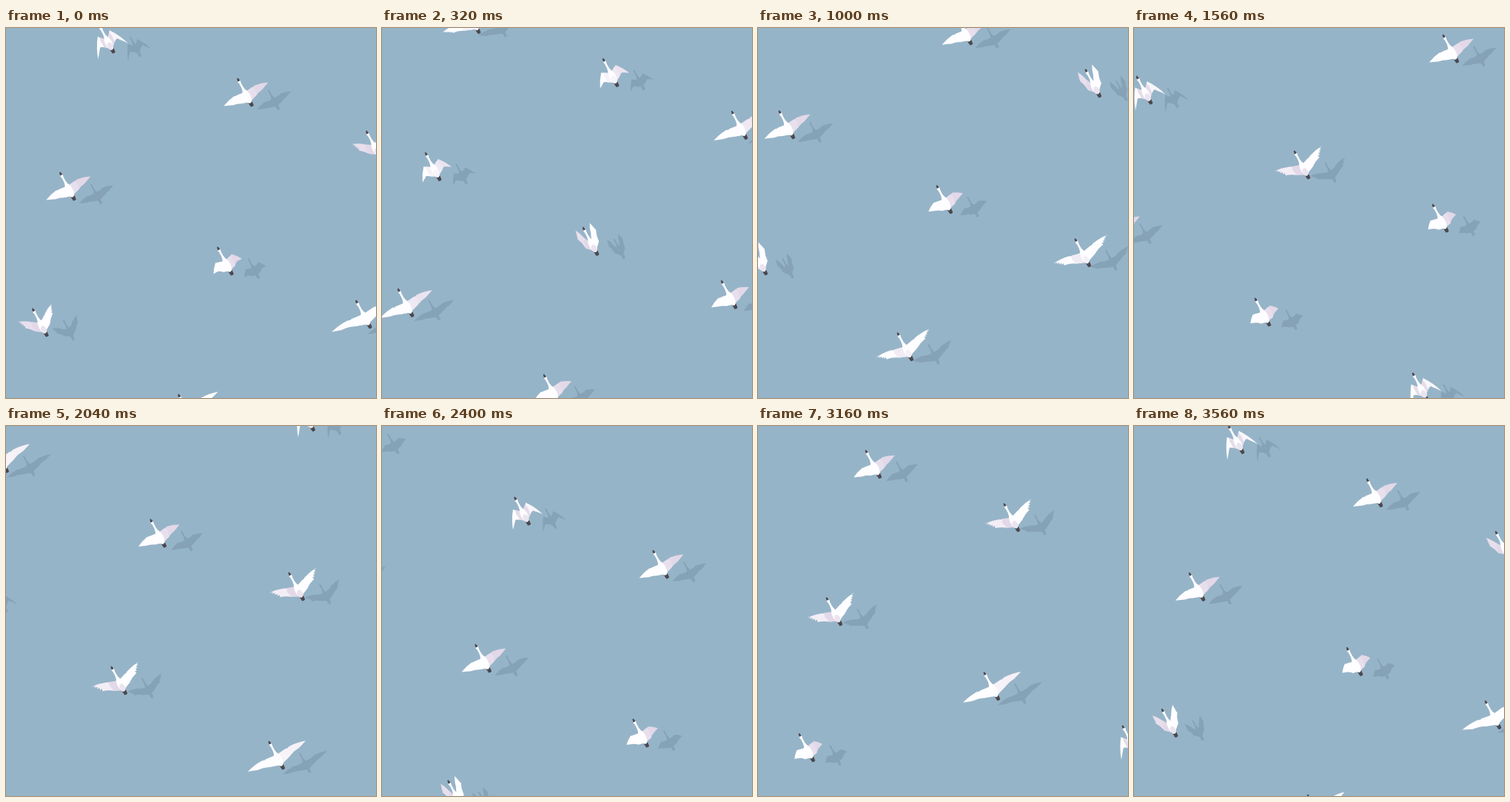
Recreate the animation shown at these times as an HTML page. Size 500 px wide and 500 px high, loop 3600 ms.

```html
<!DOCTYPE html>
<html lang="en">
<head>
<meta charset="utf-8">
<title>Swans</title>
<style>
html, body { margin: 0; width: 100%; height: 100%; overflow: hidden; background: #96b4c8; }
svg { display: block; width: 100vw; height: 100vh; }
</style>
</head>
<body>
<svg viewBox="0 0 500 500">
  <rect width="500" height="500" fill="#96b4c8"/>
  <g id="shadows" fill="#86a2b7"></g>
  <g id="birds"></g>
</svg>
<script>
const LOOP = 3600, STEP = 40, BEAT = 1120;
const DRIFT = { x: 160, y: 300 };
const WHITE = [254, 253, 255], LILAC = [226, 216, 232], DARK = "#4b484f";

// Key points of one wing as [sideways, forward] from the tail; a pose is reached at "at" and kept for "hold" ms
const POSES = [
  { at: 0, hold: 60, wrist: [6, 30], tip: [11, 42], feather: [14, 30], elbow: [10, 14] },
  { at: 160, hold: 0, wrist: [16, 25], tip: [36, 29], feather: [26, 17], elbow: [12, 10] },
  { at: 360, hold: 0, wrist: [23, 22], tip: [49, 18.5], feather: [36, 14.5], elbow: [18, 10.5] },
  { at: 490, hold: 110, wrist: [16, 21.5], tip: [34, 16.5], feather: [22, 11.5], elbow: [12, 8.5] },
  { at: 800, hold: 0, wrist: [13, 22.5], tip: [21.5, 13.5], feather: [14.5, 11], elbow: [9, 6.5] },
  { at: 1040, hold: 80, wrist: [9, 28], tip: [23, 0.5], feather: [13, 13.5], elbow: [8, 11] }
];
const ROOT = [2, 20], REAR = [1, 5];

// Each file repeats one bird every LOOP along the drift; phase sets its wing beat
const FILES = [
  { x: 305, y: 332, phase: 840 },
  { x: 492, y: 404, phase: 360 },
  { x: 252, y: 531, phase: 360 },
  { x: 215, y: 715, phase: 1000 },
  { x: 506, y: 175, phase: 120 + LOOP * 0 }
];
FILES[4].phase = FILES[3].phase + LOOP;

const mod = (a, n) => ((a % n) + n) % n;
const mix = (a, b, k) => a + (b - a) * k;
const mixPt = (p, q, k) => [mix(p[0], q[0], k), mix(p[1], q[1], k)];
const ramp = (t, a, b) => Math.min(1, Math.max(0, (t - a) / (b - a)));
const shade = k => "rgb(" + WHITE.map((c, i) => Math.round(mix(c, LILAC[i], k))) + ")";
const str = p => p.map(n => n.toFixed(2)).join(" ");

// Control point that bows the line a-b to its left by a share of its length
function bow(a, b, k) {
  const m = mixPt(a, b, 0.5);
  return [m[0] - (b[1] - a[1]) * k, m[1] + (b[0] - a[0]) * k];
}

function poseAt(t) {
  const i = POSES.findLastIndex(p => p.at <= t);
  const a = POSES[i], b = POSES[i + 1] || a;
  const k = ramp(t, a.at + a.hold, b === a ? BEAT * 2 : b.at);
  const pose = {};
  for (const key of ["wrist", "tip", "feather", "elbow"]) pose[key] = mixPt(a[key], b[key], k);
  return pose;
}

function wingShape(t) {
  const { wrist, tip, feather, elbow } = poseAt(t);
  const notch = 0.2 * ramp(t, 0, 120) * (1 - ramp(t, 240, 360));
  let edge = "";
  for (let i = 1; i <= 4; i++) {
    const gap = mixPt(mixPt(tip, feather, (i - 0.6) / 4), wrist, notch);
    edge += `L${str(gap)} L${str(mixPt(tip, feather, i / 4))} `;
  }
  const front = `M${str(ROOT)} Q${str(bow(ROOT, wrist, -0.12))} ${str(wrist)} `;
  const back = `Q${str(bow(elbow, feather, 0.1))} ${str(elbow)} L${str(REAR)} Z`;
  return {
    outer: `${front} Q${str(bow(wrist, tip, 0.08))} ${str(tip)} ${edge} ${back}`,
    inner: `M${str(ROOT)} L${str(mixPt(ROOT, wrist, 0.75))} L${str(mixPt(wrist, elbow, 0.45))} L${str(elbow)} L${str(REAR)} Z`
  };
}

// How lilac each part is: lifted wings shade the left side, sinking ones the right
function tints(t) {
  const up = 1 - ramp(t, 160, 320);
  const down = ramp(t, 880, 1000);
  const fold = ramp(t, 360, 480) * (1 - down);
  return {
    outer: [0.8 * (1 - ramp(t, 120, 200)), Math.max(fold, 0.2 * down)],
    inner: [Math.max(up, 0.9 * down), Math.max(0.8 * fold, 0.9 * down)],
    rump: 0.7 * Math.max(up, down)
  };
}

function add(parent, tag, attrs = {}) {
  const el = document.createElementNS("http://www.w3.org/2000/svg", tag);
  for (const k in attrs) el.setAttribute(k, attrs[k]);
  return parent.appendChild(el);
}

const NECK = "M-2.6 20 L-1.3 27 L-1.3 36 Q0 40 1.3 36 L1.3 27 L2.6 20 Z";
const TAIL = "M-2.8 4 L2.8 4 L2.2 -1.8 L0 -2.4 L-2.2 -1.8 Z";
const BEAK = "M-1.7 37 L0 36.4 L1.7 37 L0.8 41 L-0.8 41 Z";
const pair = g => [add(g, "path", { transform: "scale(-1,1)" }), add(g, "path")];

function makeBird(file, rank) {
  const shadow = add(document.getElementById("shadows"), "g");
  const body = add(document.getElementById("birds"), "g");

  const dark = pair(shadow);
  add(shadow, "ellipse", { cy: 13, rx: 4.6, ry: 10 });
  add(shadow, "path", { d: NECK });
  add(shadow, "path", { d: TAIL });

  const outer = pair(body), inner = pair(body);
  add(body, "path", { d: TAIL, fill: DARK });
  add(body, "ellipse", { cy: 13.2, rx: 4.6, ry: 10.2, fill: shade(0) });
  const rump = add(body, "ellipse", { cy: 8.5, rx: 3.6, ry: 5.5, fill: shade(1) });
  add(body, "path", { d: NECK, fill: shade(0) });
  add(body, "ellipse", { cy: 35.6, rx: 1.9, ry: 2.5, fill: shade(0) });
  add(body, "path", { d: BEAK, fill: DARK });
  return { file, rank, shadow, body, dark, outer, inner, rump };
}

// Maps sideways/forward axes onto the flight direction
function place(el, x, y, s) {
  const a = 0.882 * s, b = 0.471 * s;
  el.setAttribute("transform", `matrix(${a} ${-b} ${-b} ${-a} ${x} ${y})`);
}

function drawBird({ file, rank, shadow, body, dark, outer, inner, rump }, t) {
  const run = t / LOOP + rank;
  const x = file.x - DRIFT.x * run, y = file.y - DRIFT.y * run;
  place(body, x, y, 1);
  place(shadow, x + 36, y + 5, 0.77);

  const beat = mod(run * LOOP + file.phase, BEAT);
  const wing = wingShape(beat), tint = tints(beat);
  for (const side of [0, 1]) {
    dark[side].setAttribute("d", wing.outer);
    outer[side].setAttribute("d", wing.outer);
    inner[side].setAttribute("d", wing.inner);
    outer[side].setAttribute("fill", shade(tint.outer[side]));
    inner[side].setAttribute("fill", shade(tint.inner[side]));
  }
  rump.setAttribute("opacity", tint.rump);
}

const flock = FILES.flatMap(file => [-1, 0, 1].map(rank => makeBird(file, rank)));

const start = performance.now();
function frame() {
  const now = Math.max(0, performance.now() - start);
  const t = Math.floor((now % LOOP) / STEP) * STEP;
  for (const bird of flock) drawBird(bird, t);
  requestAnimationFrame(frame);
}
frame();
</script>
</body>
</html>
```
